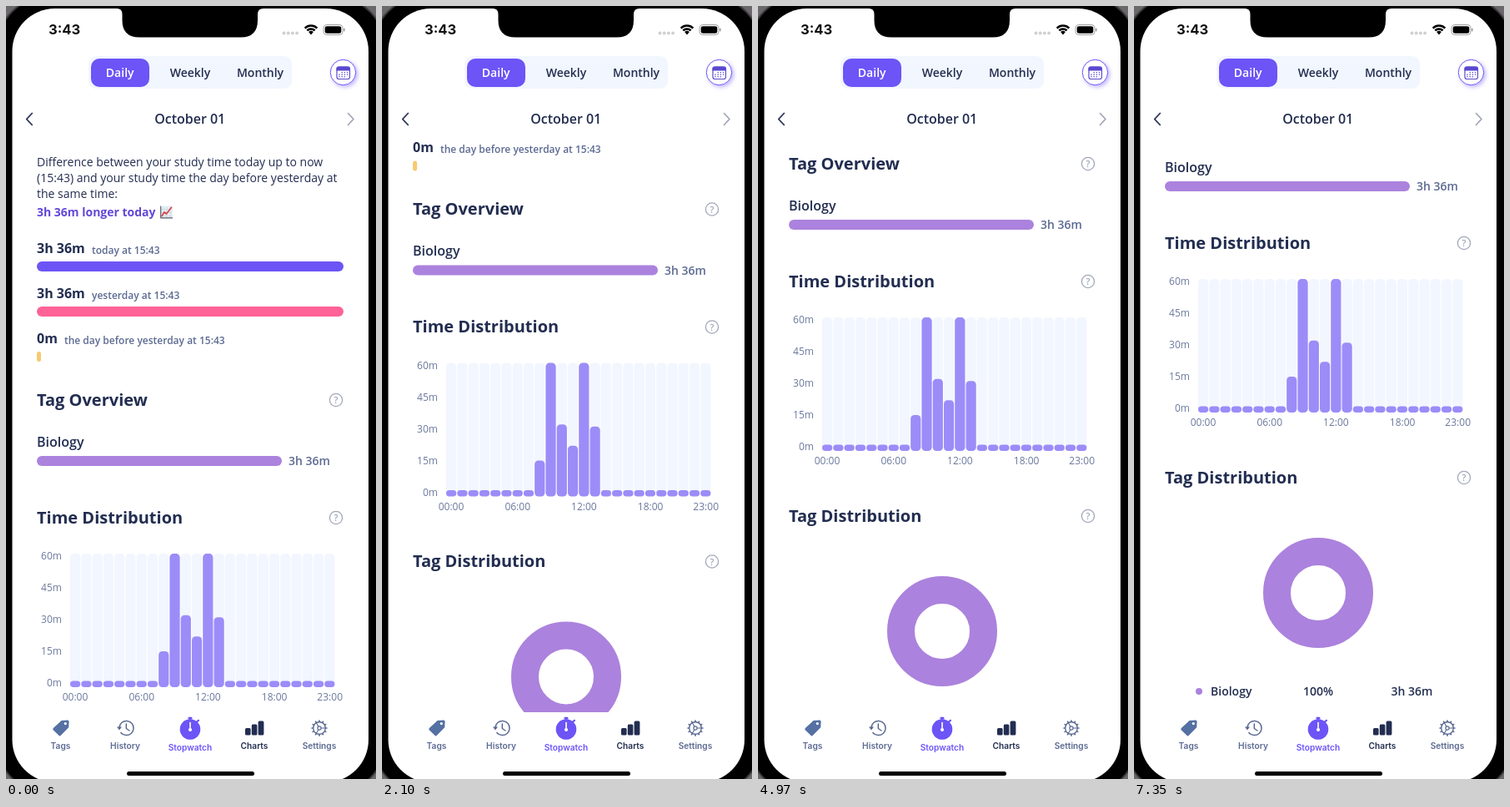
An HTML page with a canvas for the animation above (8000 ms loop, 444 px wide and 926 px high).

```html
<!DOCTYPE html>
<html lang="en">
<head>
<meta charset="utf-8">
<title>Study charts</title>
<style>
html, body { margin: 0; width: 100%; height: 100%; overflow: hidden; background: #000; }
canvas { display: block; width: 444px; height: 926px; }
</style>
</head>
<body>
<canvas id="stage"></canvas>
<script>
const W = 444, H = 926, LOOP = 8000, STEP = 70;
const canvas = document.getElementById('stage');
const ctx = canvas.getContext('2d');
const dpr = window.devicePixelRatio || 1;
canvas.width = W * dpr;
canvas.height = H * dpr;

const C = {
  violet: '#6c54f6', bar: '#9b8cf8', pale: '#f2f6fe', lilac: '#ab82dd',
  pink: '#ff6296', amber: '#f5cb70', ink: '#222d50', slate: '#5c6a92',
  axis: '#6b789d', help: '#a2a7ba', nav: '#5570a3', date: '#5a49cf'
};
const SANS = '"Open Sans", sans-serif';
const UI = 'Inter, sans-serif';

// [time, scroll offset]
const SCROLL = [
  [0, 0], [70, 6], [140, 31], [210, 69], [280, 106.5], [350, 134], [420, 157],
  [490, 174], [560, 188], [700, 208], [840, 220], [1050, 228.5],
  [4760, 228.5], [4830, 236], [4900, 257], [4970, 283], [5040, 310], [5110, 335],
  [5180, 356], [5250, 373], [5390, 398], [5530, 411], [5600, 411], [5670, 410],
  [5740, 397], [5810, 376], [5880, 359], [5950, 347], [6090, 334], [6230, 329],
  [LOOP, 329]
];
const MINUTES = { 8: 14, 9: 60, 10: 31, 11: 21, 12: 60, 13: 30 };
const PICKED = 12;

function scrollAt(t) {
  let i = 1;
  while (i < SCROLL.length - 1 && SCROLL[i][0] < t) i++;
  const [t0, a] = SCROLL[i - 1], [t1, b] = SCROLL[i];
  return a + (b - a) * (t - t0) / (t1 - t0);
}

function pickAt(t) {
  if (t < 2450 || t >= 3920) return 0;
  return Math.min(1, (t - 2380) / 140);
}

function box(x, y, w, h, r, fill) {
  ctx.beginPath();
  ctx.roundRect(x, y, w, h, r);
  ctx.fillStyle = fill;
  ctx.fill();
}

function disc(x, y, r, fill) {
  ctx.beginPath();
  ctx.arc(x, y, r, 0, Math.PI * 2);
  ctx.fillStyle = fill;
  ctx.fill();
}

function ring(x, y, r, color, width) {
  ctx.beginPath();
  ctx.arc(x, y, r, 0, Math.PI * 2);
  ctx.strokeStyle = color;
  ctx.lineWidth = width;
  ctx.stroke();
}

function line(points, color, width) {
  ctx.beginPath();
  points.forEach(([x, y]) => ctx.lineTo(x, y));
  ctx.strokeStyle = color;
  ctx.lineWidth = width;
  ctx.lineCap = ctx.lineJoin = 'round';
  ctx.stroke();
}

// Line from radius r0 to r1 at angle a
function spoke(x, y, a, r0, r1, color, width) {
  const c = Math.cos(a), s = Math.sin(a);
  line([[x + r0 * c, y + r0 * s], [x + r1 * c, y + r1 * s]], color, width);
}

// y is the middle of the capitals
function text(str, x, y, size, weight, color, align = 'left', family = SANS) {
  ctx.font = `${weight} ${size}px ${family}`;
  ctx.textAlign = align;
  ctx.fillStyle = color;
  ctx.fillText(str, x, y + size * 0.36);
}

function shadow(color, blur, dx, dy) {
  ctx.shadowColor = color;
  ctx.shadowBlur = blur * dpr;
  ctx.shadowOffsetX = dx * dpr;
  ctx.shadowOffsetY = dy * dpr;
}

function noShadow() {
  shadow('transparent', 0, 0, 0);
}

function heading(str, y) {
  text(str, 37, y - 0.3, 20, 700, C.ink);
  ring(396, y, 7.6, C.help, 1.3);
  text('?', 396, y + 0.2, 11, 600, C.help, 'center');
}

function summary(y, total, label, labelX, width, color) {
  text(total, 37, y, 16, 700, C.ink);
  text(label, labelX, y + 2.6, 12, 600, C.slate);
  box(37, y + 16, width, 12, Math.min(6, width / 2), color);
}

function trendIcon(x, y) {
  box(x, y, 15, 15, 1, '#e9eff3');
  for (let i = 1; i < 4; i++) {
    line([[x + 1, y + i * 4], [x + 14, y + i * 4]], '#c4d3dc', 0.6);
    line([[x + i * 4, y + 1], [x + i * 4, y + 14]], '#c4d3dc', 0.6);
  }
  line([[x + 0.7, y + 0.5], [x + 0.7, y + 14.3], [x + 14.5, y + 14.3]], '#55636e', 1.2);
  line([[x + 2, y + 12], [x + 5, y + 7.5], [x + 7.5, y + 9.5], [x + 13.5, y + 1.8]], '#d8434f', 1.7);
}

function hours(pick) {
  for (let m = 0; m <= 60; m += 15)
    text(m + 'm', 67, 811 - m * 38 / 15, 12, 400, C.axis, 'right');
  for (let i = 0; i < 24; i++) {
    const x = 77 + i * 13.27;
    const h = 7.5 + (MINUTES[i] || 0) * 2.54;
    const r = Math.min(4.5, h / 2);
    box(x, 656, 12.2, 160, 4.5, C.pale);
    box(x, 816 - h, 12.2, h, r, C.bar);
    if (i === PICKED && pick) {
      ctx.globalAlpha = pick;
      box(x, 816 - h, 12.2, h, r, C.violet);
      ctx.globalAlpha = 1;
    }
  }
  ['00:00', '06:00', '12:00', '18:00'].forEach((s, i) =>
    text(s, 83 + i * 79.7, 828, 12, 400, C.axis, 'center'));
  text('23:00', 404, 828, 12, 400, C.axis, 'right');
  if (pick) {
    ctx.globalAlpha = pick;
    shadow('rgba(108,84,246,.35)', 5, 2, 2);
    box(228, 631, 29, 23, 11, C.violet);
    noShadow();
    text('1h', 242.3, 642.5, 12, 700, '#fff', 'center');
    ctx.globalAlpha = 1;
  }
}

function content(offset, pick) {
  ctx.save();
  ctx.beginPath();
  ctx.rect(8, 157, 426, 689);
  ctx.clip();
  ctx.translate(0, -offset);

  text('Difference between your study time today up to now', 37, 187, 14, 400, C.ink);
  text('(15:43) and your study time the day before yesterday at', 37, 206, 14, 400, C.ink);
  text('the same time:', 37, 225, 14, 400, C.ink);
  text('3h 36m longer today', 37, 247, 14, 700, '#6248d8');
  trendIcon(185, 239.5);

  summary(290, '3h 36m', 'today at 15:43', 103, 368, C.violet);
  summary(344, '3h 36m', 'yesterday at 15:43', 103, 368, C.pink);
  summary(398, '0m', 'the day before yesterday at 15:43', 70, 5, C.amber);

  heading('Tag Overview', 472);
  text('Biology', 37, 522, 16, 600, C.ink);
  box(37, 539, 294, 12, 6, C.lilac);
  text('3h 36m', 339, 545, 14, 600, C.slate);

  heading('Time Distribution', 613);
  hours(pick);

  heading('Tag Distribution', 894);
  ring(221, 1032, 49.5, C.lilac, 33);
  disc(78, 1150, 4, C.lilac);
  text('Biology', 92, 1150, 14, 600, C.ink);
  text('100%', 221, 1150, 14, 600, C.ink, 'center');
  text('3h 36m', 333.5, 1150, 14, 600, C.ink, 'center');
  ctx.restore();
}

function statusBar() {
  text('3:43', 51, 28.3, 16.6, 650, '#111', 'left', UI);
  for (let i = 0; i < 4; i++) disc(333.5 + i * 5.2, 32.5, 1.9, '#cfcfd2');

  const a = Math.PI * 1.25, b = Math.PI * 1.75;
  ctx.strokeStyle = '#000';
  ctx.lineCap = 'butt';
  ctx.lineWidth = 2.5;
  for (const r of [10.4, 6.6]) {
    ctx.beginPath();
    ctx.arc(366, 34, r, a, b);
    ctx.stroke();
  }
  ctx.beginPath();
  ctx.moveTo(366, 34.5);
  ctx.arc(366, 34, 4.1, a, b);
  ctx.fillStyle = '#000';
  ctx.fill();

  ctx.beginPath();
  ctx.roundRect(381, 22.5, 23, 12, 3.8);
  ctx.strokeStyle = '#a0a0a2';
  ctx.lineWidth = 1;
  ctx.stroke();
  box(382.7, 24.2, 19.6, 8.6, 2.4, '#000');
  box(405, 26.5, 1.6, 4, 1, '#a0a0a2');
}

function calendarButton() {
  shadow('rgba(108,84,246,.45)', 5, 2, 2);
  disc(404.5, 79.5, 15.5, '#fff');
  noShadow();
  ring(404.5, 79.5, 15.2, C.violet, 1);
  box(396.5, 72.5, 16.5, 5, [2.5, 2.5, 0, 0], C.date);
  ctx.beginPath();
  ctx.roundRect(397, 73, 15.5, 14.5, 2.5);
  ctx.strokeStyle = C.date;
  ctx.lineWidth = 1.2;
  ctx.stroke();
  for (let i = 1; i < 11; i++)
    disc(400 + i % 4 * 3.2, 79.8 + Math.floor(i / 4) * 2.5, 0.8, C.date);
}

function header() {
  box(99, 60, 244, 39, 9, C.pale);
  box(102, 63, 70, 34, 10, C.violet);
  text('Daily', 136.7, 80, 14, 600, '#fff', 'center');
  text('Weekly', 221, 80, 14, 600, C.ink, 'center');
  text('Monthly', 305, 80, 14, 600, C.ink, 'center');
  calendarButton();
  line([[31.3, 128.5], [24.7, 135.5], [31.3, 142.5]], C.ink, 1.7);
  line([[410.5, 128.5], [417, 135.5], [410.5, 142.5]], '#9a9fb2', 1.5);
  text('October 01', 220.7, 135.5, 16, 600, C.ink, 'center');
}

function tagIcon() {
  ctx.beginPath();
  ctx.moveTo(66.5, 856);
  ctx.lineTo(73.8, 855.4);
  ctx.quadraticCurveTo(75.6, 855.4, 75.6, 857);
  ctx.lineTo(75.2, 864.2);
  ctx.lineTo(65.8, 873.8);
  ctx.quadraticCurveTo(64.6, 875, 63.4, 873.8);
  ctx.lineTo(56.8, 867.4);
  ctx.quadraticCurveTo(55.6, 866.2, 56.8, 865);
  ctx.closePath();
  ctx.fillStyle = C.nav;
  ctx.fill();
  disc(71.3, 859.6, 1.6, '#fff');
}

function historyIcon() {
  ctx.beginPath();
  ctx.arc(144.5, 865, 8.6, Math.PI * 1.02, Math.PI * 2.78);
  ctx.strokeStyle = C.slate;
  ctx.lineWidth = 1.5;
  ctx.lineCap = 'round';
  ctx.stroke();
  line([[144.3, 860], [144.3, 865.5], [148, 868]], C.slate, 1.5);
  ctx.beginPath();
  ctx.moveTo(133, 863.5);
  ctx.lineTo(139, 863.5);
  ctx.lineTo(136, 867.5);
  ctx.fillStyle = C.slate;
  ctx.fill();
}

function stopwatchIcon() {
  box(218.5, 851.7, 5, 2.6, 1, C.violet);
  box(219.8, 853, 2.4, 4, 0, C.violet);
  line([[229.5, 857.3], [231, 855.8]], C.violet, 2.2);
  disc(221, 866.5, 12.3, C.violet);
  line([[221, 858.5], [221, 866]], '#fff', 1.6);
  disc(221, 867, 2.1, '#fff');
}

function gearIcon() {
  const x = 376, y = 865, turn = Math.PI * 2;
  ring(x, y, 7.3, C.slate, 1.4);
  for (let i = 0; i < 12; i++) spoke(x, y, i / 12 * turn, 8, 8.9, C.slate, 1.7);
  ring(x, y, 2.1, C.slate, 1.2);
  for (let i = 0; i < 3; i++) spoke(x, y, i / 3 * turn, 2.6, 6.8, C.slate, 1.1);
}

function navBar() {
  tagIcon();
  historyIcon();
  stopwatchIcon();
  box(287, 865, 6.6, 8.5, 1.5, C.ink);
  box(294.8, 860.5, 6.6, 13, 1.5, C.ink);
  box(302.6, 856.5, 6.8, 17, 1.5, C.ink);
  gearIcon();
  const label = (s, x, y, color) => text(s, x, y, 10.2, 600, color, 'center', UI);
  label('Tags', 65.5, 886, C.slate);
  label('History', 143, 886, C.slate);
  label('Stopwatch', 221, 888.7, C.violet);
  label('Charts', 298, 886, C.ink);
  label('Settings', 376, 886, C.slate);
  box(145, 917, 153, 5, 2.5, '#000');
}

function phone() {
  ctx.fillStyle = '#6a686b';
  ctx.fillRect(0, 0, W, H);
  box(-14, -15, 472, 962, 71, '#3c3a3d');
  box(-12, -13, 468, 958, 69, '#000');
  box(7.5, 3, 427.5, 927, 51, '#fff');
}

function notch() {
  ctx.beginPath();
  ctx.moveTo(133, 0);
  ctx.lineTo(133, 3);
  ctx.quadraticCurveTo(139.5, 3, 139.5, 10);
  ctx.lineTo(139.5, 17);
  ctx.quadraticCurveTo(139.5, 37.5, 160, 37.5);
  ctx.lineTo(282, 37.5);
  ctx.quadraticCurveTo(302, 37.5, 302, 17);
  ctx.lineTo(302, 10);
  ctx.quadraticCurveTo(302, 3, 309, 3);
  ctx.lineTo(309, 0);
  ctx.fillStyle = '#000';
  ctx.fill();
}

function draw(t) {
  ctx.setTransform(dpr, 0, 0, dpr, 0, 0);
  phone();
  content(scrollAt(t), pickAt(t));
  statusBar();
  header();
  navBar();
  notch();
}

const start = performance.now();
function tick() {
  const t = (performance.now() - start) % LOOP;
  draw(Math.floor(t / STEP) * STEP);
  requestAnimationFrame(tick);
}
tick();
</script>
</body>
</html>
```
